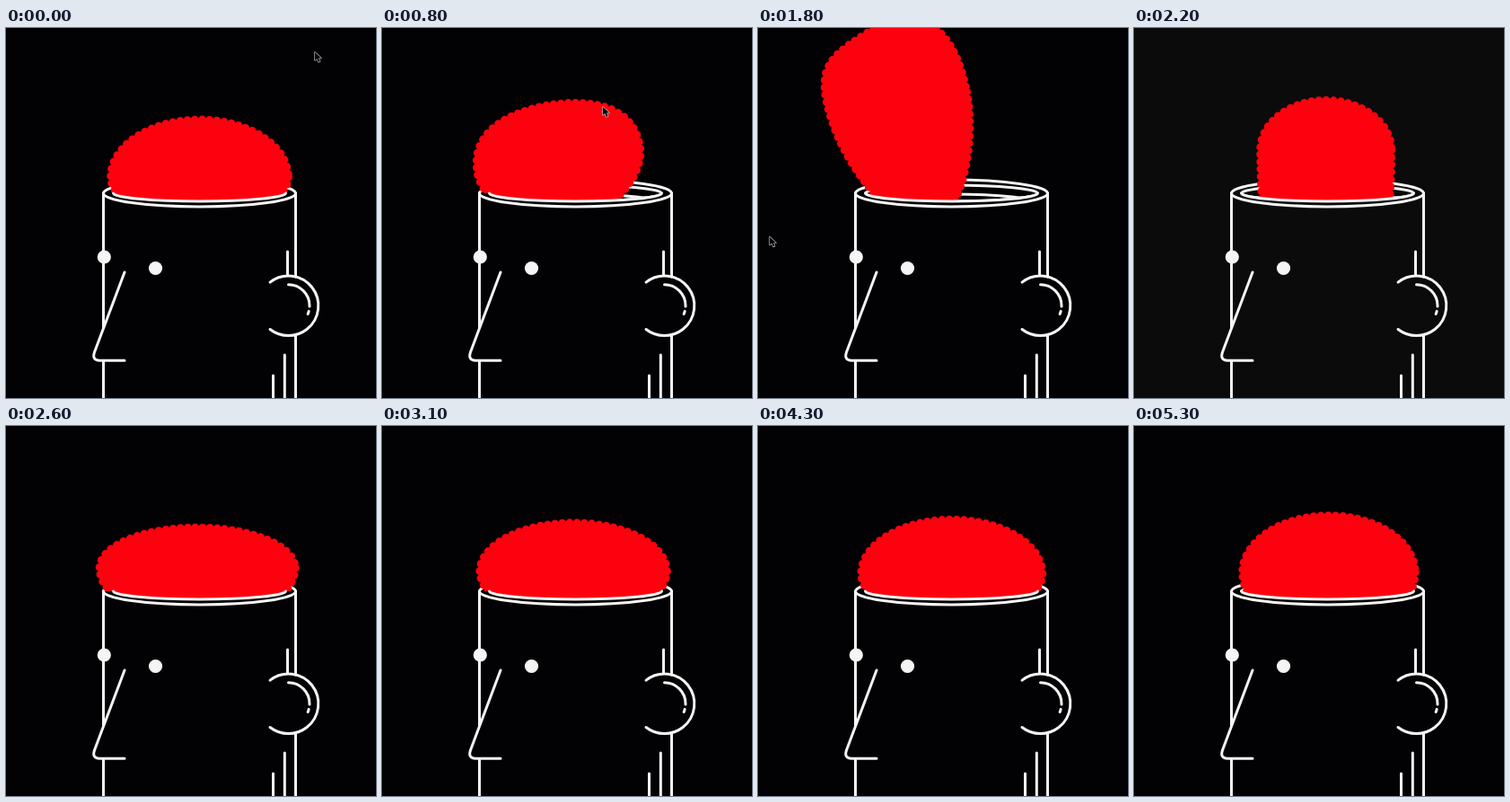
An HTML page with a canvas that plays this animation: 412x412 px, repeating every 5.4 s.

```html
<!DOCTYPE html>
<html lang="en">
<head>
<meta charset="utf-8">
<title>Jelly head</title>
<style>
  html, body { margin: 0; overflow: hidden; background: #020103; }
  canvas { display: block; }
</style>
</head>
<body>
<canvas id="stage" width="412" height="412"></canvas>
<script>
const ctx = document.getElementById('stage').getContext('2d');
const SIZE = 412, LOOP = 5400, STEP = 100;
const GRAB = 700, HANG = 1400, RELEASE = 1500, LAND = 1900;
const RED = '#fd020e', WHITE = '#f5f5f5';
const CENTRE = 215.5, TAU = Math.PI * 2, DEG = Math.PI / 180;

const lerp = (a, b, k) => a + (b - a) * k;
const pulse = (t, peak, width) => Math.max(0, 1 - Math.abs(t - peak) / width);

// Two half ellipses joined at the waist; a > 0 stretches, a < 0 squashes
function dome(cx, a) {
  const up = Math.max(a, 0), down = Math.max(-a, 0);
  const w = 99 - 1.2 * up + 0.5 * down;
  const top = 102 - up + 0.55 * down;
  const waist = 166 - 1.4 * up - 0.4 * down;
  const below = 47 + 9 * up + 0.6 * down;
  return Array.from({ length: 80 }, (_, i) => {
    const angle = TAU * i / 80, sin = Math.sin(angle);
    return [cx + w * Math.cos(angle), waist + sin * (sin < 0 ? waist - top : below)];
  });
}

// Bends the resting dome along a curved spine; k = 1 hangs over the left rim
function bend(points, k, lift) {
  const rise = lift * Math.sin(Math.PI * k);
  const x0 = lerp(CENTRE, 160, k), y0 = lerp(213, 225, k);
  const x1 = lerp(CENTRE, 62, k), y1 = lerp(157.5, 88, k) - rise / 2;
  const x2 = lerp(CENTRE, 16, k), y2 = lerp(102, 276, k) - rise;
  return points.map(([x, y]) => {
    const s = (213 - y) / 111;
    const across = (x - CENTRE) / 99 * (lerp(99, 28, k) + 46 * k * s);
    const dx = lerp(x1 - x0, x2 - x1, s), dy = lerp(y1 - y0, y2 - y1, s);
    const len = Math.hypot(dx, dy);
    return [
      lerp(lerp(x0, x1, s), lerp(x1, x2, s), s) - across * dy / len,
      lerp(lerp(y0, y1, s), lerp(y1, y2, s), s) + across * dx / len
    ];
  });
}

function jellyAt(t) {
  if (t >= LAND) {
    const dt = t - 2870;
    const bounce = 17 * Math.exp(-dt / 1250) * Math.cos(TAU * dt / 600);
    return dome(215 - 2 * Math.sin(TAU * (t - 1700) / 4600), bounce);
  }
  const rest = dome(CENTRE, 0);
  if (t <= GRAB) return rest;
  if (t <= RELEASE) return bend(rest, Math.min(1, (t - GRAB) / (HANG - GRAB)), 95);
  return bend(rest, 1 - ((t - RELEASE) / (LAND - RELEASE)) ** 2, 180);
}

function drawJelly(points) {
  ctx.beginPath();
  points.forEach(p => ctx.lineTo(...p));
  ctx.closePath();
  ctx.fillStyle = ctx.strokeStyle = RED;
  ctx.fill();
  // Zero-length round dashes make the beaded edge
  ctx.lineWidth = 9;
  ctx.setLineDash([0, 8.2]);
  ctx.stroke();
  ctx.setLineDash([]);
}

function ring(cy, rx, ry, to = TAU) {
  ctx.beginPath();
  ctx.ellipse(CENTRE, cy, rx, ry, 0, 0, to);
  ctx.stroke();
}

function rim(to) {
  ring(184, 107, 15, to);
  ring(184, 96, 9, to);
}

function drawBack() {
  ctx.strokeStyle = WHITE;
  ctx.lineWidth = 3;
  rim();
  ctx.save();
  ctx.clip();
  ring(195, 96, 10);
  ctx.restore();
}

const headLines = new Path2D('M108.5 184V334M108.5 372V415M322.5 184V277M322.5 342V415' +
  'M313.5 249V275M310.3 364V415M297.5 387V415M132 272L98.5 361Q95.5 370 104 370.3H132');

function drawFront(bg) {
  ctx.beginPath();
  ctx.ellipse(CENTRE, 184, 96, 9, 0, Math.PI, 0, true);
  ctx.lineTo(322.5, 184);
  ctx.lineTo(322.5, SIZE);
  ctx.lineTo(108.5, SIZE);
  ctx.lineTo(108.5, 184);
  ctx.fillStyle = bg;
  ctx.fill();

  ctx.strokeStyle = ctx.fillStyle = WHITE;
  ctx.lineWidth = 3;
  rim(Math.PI);
  ctx.stroke(headLines);

  const arc = (x, y, r, from, to) => {
    ctx.beginPath();
    ctx.arc(x, y, r, from * DEG, to * DEG);
  };
  for (const [r, from, to] of [[33.3, -128, 128], [23.5, -90, 2], [23.5, 15, 23]]) {
    arc(314.5, 309.3, r, from, to);
    ctx.stroke();
  }
  for (const [x, y] of [[109.3, 255], [166.5, 267.5]]) {
    arc(x, y, 7.6, 0, 360);
    ctx.fill();
  }
}

const arrow = new Path2D('M0 0V9L2.2 7.2L4 11L5.6 10.2L4 6.6H7Z');
function drawPointer(t) {
  const k = (t / HANG) ** 1.5;
  ctx.save();
  ctx.translate(lerp(344, 117, k), lerp(27, 168, k));
  ctx.fillStyle = '#050505';
  ctx.strokeStyle = '#bbb';
  ctx.lineWidth = 1.4;
  ctx.stroke(arrow);
  ctx.fill(arrow);
  ctx.restore();
}

function draw(now) {
  const t = Math.floor((now % LOOP) / STEP) * STEP;
  const red = pulse(t, 1400, 400), grey = pulse(t, 2200, 400);
  const bg = `rgb(${2 + 22 * red + 9 * grey}, ${1 + red + 10 * grey}, ${3 + red + 8 * grey})`;
  ctx.fillStyle = bg;
  ctx.fillRect(0, 0, SIZE, SIZE);
  ctx.lineCap = ctx.lineJoin = 'round';
  drawBack();
  drawJelly(jellyAt(t));
  drawFront(bg);
  drawPointer(t);
  requestAnimationFrame(draw);
}
requestAnimationFrame(draw);
</script>
</body>
</html>
```
